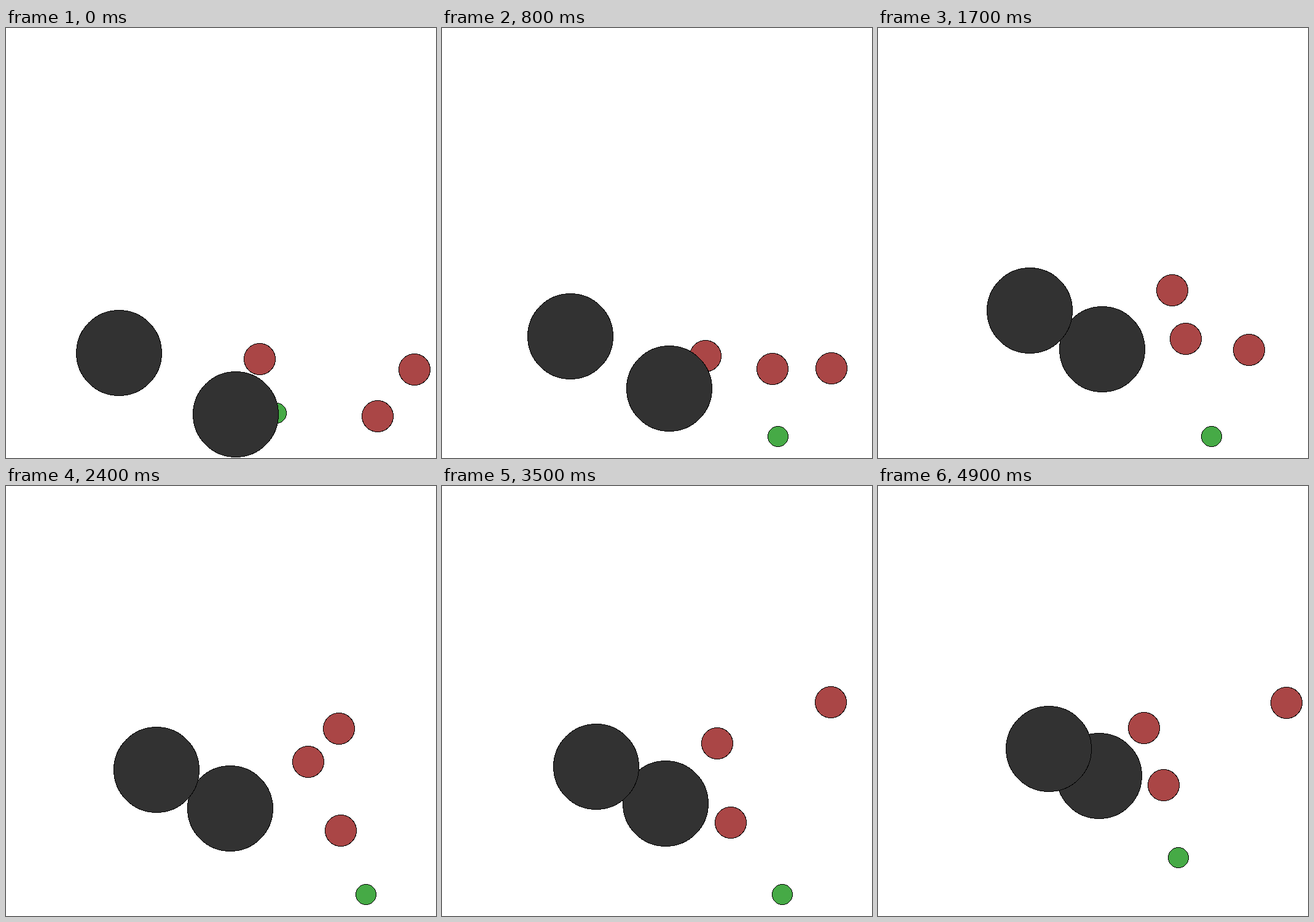
An HTML page for the animation above (5 s loop, 700 by 700 pixels).

```html
<!DOCTYPE html>
<html>
<head>
<meta charset="utf-8">
<style>
  html, body { margin: 0; overflow: hidden; background: #fff; }
  svg { display: block; }
  circle { stroke: #000; shape-rendering: crispEdges; }
</style>
</head>
<body>
<svg id="stage" width="700" height="700"></svg>
<script>
const STEP = 100, LOOP = 5000, EDGE = 665;
const RED = '#aa4646', GREEN = '#46aa46', DARK = '#323232';

// Turning points shared by the small discs, in steps; points past the edge are held at it
const turns = [0, 8, 17, 24, 35, 44, 49];

// Shared progress of the two dark discs along their straight lines
const progressTurns = [0, 6, 8, 12, 17, 21, 24, 35, 44, 49];
const progress = [0, .106, .267, .544, .675, .628, .658, .713, .908, 1];

function at(times, values, step) {
  let i = 1;
  while (times[i] < step) i++;
  const k = (step - times[i - 1]) / (times[i] - times[i - 1]);
  return values[i - 1] + (values[i] - values[i - 1]) * k;
}

function disc(radius, color, place) {
  const el = document.createElementNS('http://www.w3.org/2000/svg', 'circle');
  el.setAttribute('r', radius);
  el.setAttribute('fill', color);
  stage.append(el);
  return { el, place };
}

const roamer = (radius, color, xs, ys) => disc(radius, color, step =>
  [xs, ys].map(values => Math.min(EDGE, at(turns, values, step))));

const slider = (x, y, dx, dy) => disc(69.5, DARK, step => {
  const p = at(progressTurns, progress, step);
  return [x + dx * p, y + dy * p];
});

const discs = [
  roamer(25.5, RED, [413, 429, 479, 542, 633, 674, 665], [539, 534, 427, 395, 352, 333, 353]),
  roamer(25.5, RED, [605, 538, 501, 492, 448, 437, 433], [632, 555, 506, 449, 419, 396, 394]),
  roamer(25.5, RED, [760, 634, 604, 545, 470, 463, 465], [556, 554, 524, 561, 548, 523, 487]),
  roamer(16.5, GREEN, [440, 547, 543, 586, 554, 494, 489], [627, 728, 665, 665, 672, 627, 605]),
  slider(374, 628.6, -14, -157),
  slider(183.6, 528.6, 94, -101)
];

function draw() {
  const step = Math.floor(performance.now() % LOOP / STEP);
  for (const { el, place } of discs) {
    const [x, y] = place(step).map(Math.round);
    el.setAttribute('cx', x);
    el.setAttribute('cy', y);
  }
  requestAnimationFrame(draw);
}
draw();
</script>
</body>
</html>
```
